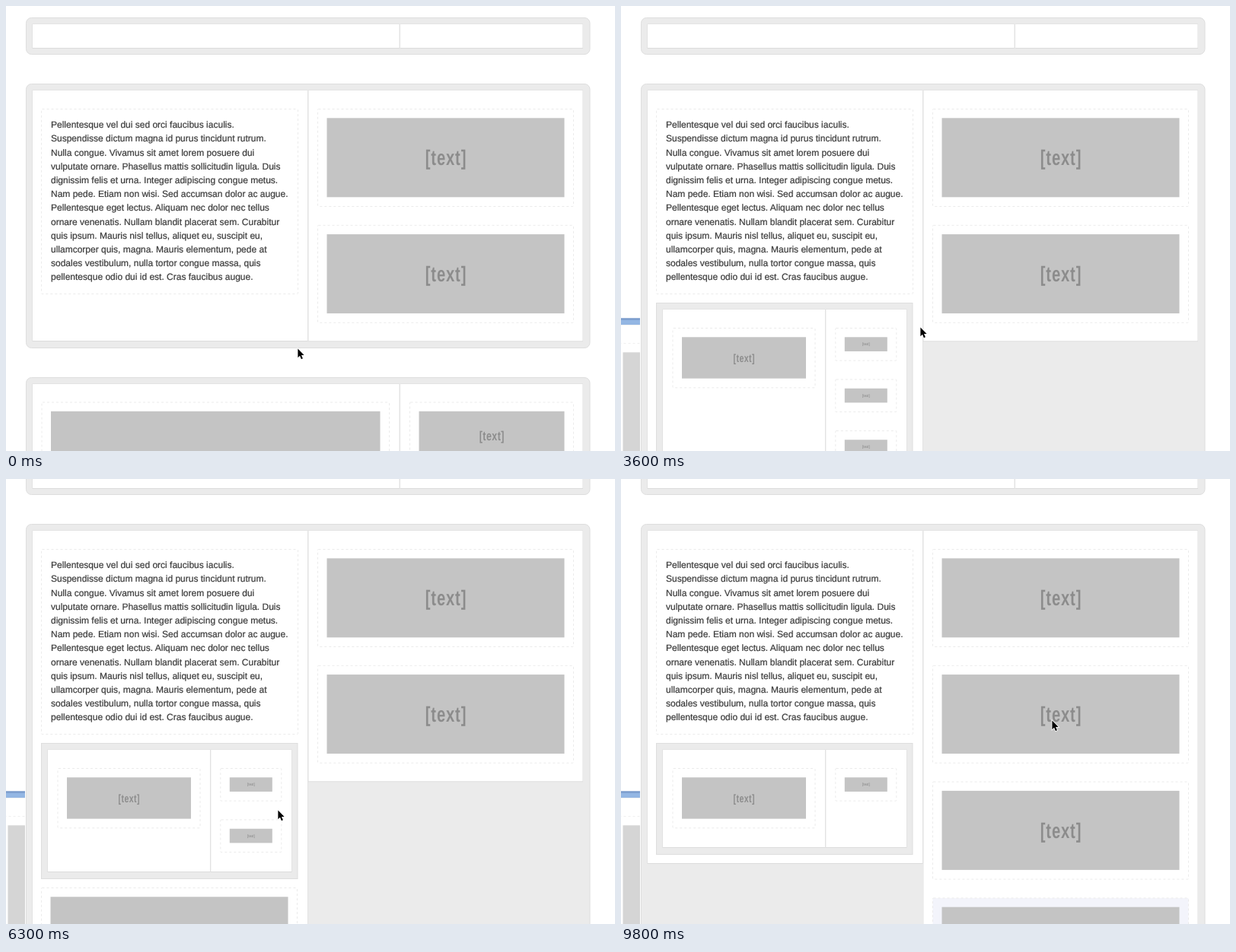
An HTML page that plays this animation: 800x585 px, repeating every 10000 ms.

```html
<!DOCTYPE html>
<html lang="en">
<head>
<meta charset="utf-8">
<title>Drag and drop layout</title>
<style>
  html, body { margin: 0; width: 100%; height: 100%; overflow: hidden; background: #fff; }
  svg { display: block; width: 800px; height: 585px; }
  text { font-family: "Liberation Sans", Arial, sans-serif; text-rendering: geometricPrecision; white-space: pre; }
</style>
</head>
<body>
<svg id="stage" viewBox="0 0 800 585" xmlns="http://www.w3.org/2000/svg"></svg>
<script>
const LOOP = 10000, STEP = 100;
const BLUE = '#6698d8', EDGE = '#4474b8', OUTLINE = '#5a8ac8';
const GAP = 24.8, PAD = 12, WIDE = 312;

const LINES = [
  'Pellentesque vel dui sed orci faucibus iaculis.',
  'Suspendisse dictum magna id purus tincidunt rutrum.',
  'Nulla congue. Vivamus sit amet lorem posuere dui',
  'vulputate ornare. Phasellus mattis sollicitudin ligula. Duis',
  'dignissim felis et urna. Integer adipiscing congue metus.',
  'Nam pede. Etiam non wisi. Sed accumsan dolor ac augue.',
  'Pellentesque eget lectus. Aliquam nec dolor nec tellus',
  'ornare venenatis. Nullam blandit placerat sem. Curabitur',
  'quis ipsum. Mauris nisl tellus, aliquet eu, suscipit eu,',
  'ullamcorper quis, magna. Mauris elementum, pede at',
  'sodales vestibulum, nulla tortor congue massa, quis',
  'pellentesque odio dui id est. Cras faucibus augue.'
];

// Time, then the values reached at that time.
const POINTER = [
  [0, 383, 450], [700, 372, 476], [1100, 361, 482], [1200, 361, 482],
  [2100, 304.5, 404.5], [2700, 304.5, 404.5], [3600, 393, 422], [3800, 368, 450],
  [4200, 322, 572], [4300, 322, 572], [4700, 317, 290], [4900, 317, 288],
  [6000, 352, 420], [6100, 352, 420], [6300, 357, 435], [6700, 230, 560],
  [7300, 577, 238], [7600, 577, 240], [8300, 309, 405], [8500, 309, 421],
  [8900, 309, 421], [9200, 440, 200], [9500, 566, 312], [9800, 566, 317]
];
const SCROLL = [[5400, 0], [6000, 38], [6100, 38], [6200, 43]];

const DRAGS = [
  { hot: 500, start: 1200, drop: 2800 },
  { hot: 4100, start: 4300, drop: 4775 },
  { hot: 6600, start: 6700, drop: 7360 },
  { hot: 8200, start: 8900, drop: 9455 }
];

function track(keys, t) {
  const next = keys.findIndex(key => key[0] > t);
  if (next === 0) return keys[0].slice(1);
  if (next < 0) return keys[keys.length - 1].slice(1);
  const a = keys[next - 1], b = keys[next];
  const u = (t - a[0]) / (b[0] - a[0]), k = u * u * (3 - 2 * u);
  return a.slice(1).map((v, i) => v + (b[i + 1] - v) * k);
}

const rect = (x, y, w, h, attrs) => `<rect x="${x}" y="${y}" width="${w}" height="${h}" ${attrs}/>`;
const group = (attrs, body) => `<g ${attrs}>${body}</g>`;
const shift = (x, y, body) => group(`transform="translate(${x} ${y})"`, body);

const handle = (x, y) =>
  `<path transform="translate(${x} ${y})" fill="${OUTLINE}" d="M0-6 4.5-1H2v2h2.5L0 6-4.5 1H-2v-2h-2.5Z"/>`;

const tag = (x, y) => rect(x - 6, y - 19.5, 107, 17.5, 'rx="1.5" fill="#3a3a3a"') +
  `<text x="${x}" y="${y - 6}" font-size="11.8" fill="#fff" stroke="#fff" stroke-width=".2">ENTER TO MOVE</text>`;

function flash(age) {
  if (age < 0 || age > 1000) return null;
  const k = Math.exp(-age / 150);
  return `rgb(${[135, 150, 212].map(c => Math.round(255 - (255 - c) * k))})`;
}

function outline(x, y, w, h, hot, fill) {
  const line = hot ? `stroke="${OUTLINE}"` : 'stroke="#ebebeb" stroke-dasharray="3 3"';
  return rect(x + .5, y + .5, w, h, `rx="1" fill="${fill || 'none'}" ${line}`);
}

const itemHeight = w => w / 3 + 2 * PAD;

// A placeholder picture; x and y are the corner of its dashed frame, w the picture's width.
function item(x, y, w, { hot, target, fill } = {}) {
  const s = w / WIDE, px = x + PAD + .5, py = y + PAD + .3;
  const picture = rect(px, py, w, w / 3, 'fill="#c4c4c4"') +
    `<text transform="translate(${px + w / 2 + .5 * s} ${py + 61.8 * s}) scale(${.72 * s} ${s})" ` +
    'font-size="28" font-weight="700" letter-spacing="1.2" text-anchor="middle" fill="#8c8c8c">[text]</text>';
  return outline(x, y, w + 2 * PAD, itemHeight(w), hot || target, fill) +
    group(`opacity="${target ? .55 : 1}"`, picture) +
    (hot ? handle(x + PAD + w / 2, y - 3) : '') + (target ? tag(x, y) : '');
}

function items(x, y, w, count, options = () => ({})) {
  return Array.from({ length: count }, (_, i) =>
    item(x, y + i * (itemHeight(w) + GAP), w, options(i))).join('');
}

const column = (x1, x2, top, bottom) =>
  rect(x1 - .5, top - .5, x2 - x1 + 1, bottom - top + 1.5, 'fill="#dcdcdc"') +
  rect(x1, top, x2 - x1, bottom - top, 'fill="#fff"');

function row(y, bottom, hot) {
  if (!hot) return rect(26.5, y + .5, 740.5, bottom - y, 'rx="7" fill="#ebebeb" stroke="#dedede"');
  return rect(27, y + 1, 739.5, bottom - y - 1, `rx="7" fill="${BLUE}" stroke="${EDGE}" stroke-width="2.4"`) +
    handle(396.5, y - 4);
}

const columns = (split, top, left, right) =>
  column(35, split - .7, top, left) + column(split + .7, 757.5, top, right);

function sideRow(hot) {
  return row(488, 760, hot) + columns(517.3, 497, 750, 750) +
    item(46.5, 520.5, 432.5) + items(530, 520.5, 191, 2);
}

function paragraph(target) {
  const color = target ? '#86a6de' : '#3c3c3c';
  const lines = LINES.map((line, i) => `<text x="59" y="${160.3 + i * 18.18}">${line}</text>`).join('');
  return outline(46, 135, 337, 243, target) +
    group(`font-size="12" fill="${color}" stroke="${color}" stroke-width=".22"`, lines) +
    (target ? tag(46, 135) : '');
}

function nestedRow(bottom, count, fill, hotIndex) {
  const inner = bottom - 9;
  return rect(46.5, 390.5, 336.5, bottom - 390, `fill="${fill || '#ebebeb'}" stroke="#dedede"`) +
    column(55, 268, 399, inner) + column(269.3, 375, 399, inner) +
    item(67.5, 423, 163) + items(281.3, 423, 56, count, i => ({ hot: i === hotIndex }));
}

function ghost(index, dx, dy) {
  const body = [
    () => sideRow(true),
    () => item(281.3, 423 + 2 * (itemHeight(56) + GAP), 56),
    () => item(46, 580, WIDE),
    () => item(281.3, 423, 56)
  ][index]();
  const backing = index ? '' : rect(27, 488, 740, 280, 'rx="7" fill="#fff" opacity=".5"');
  return shift(dx, dy, backing + group('opacity=".7"', body));
}

function arrow([x, y], copying) {
  const badge = '<circle cx="8" cy="17.8" r="7.5" fill="#4c9a20" stroke="#3b7d18"/>' +
    '<path d="M4.5 17.8h7M8 14.3v7" stroke="#fff" stroke-width="2"/>';
  return shift(x, y, '<path d="M.4.6V12.2L3 9.8 4.9 14.2 6.9 13.3 5 9H8.6Z" ' +
    'fill="#000" stroke="#fff" paint-order="stroke" stroke-width="1.6"/>' + (copying ? badge : ''));
}

function dropTarget(drag, x, y, nested, count) {
  if (drag < 0) return '';
  if (x > 397) {
    const i = Math.floor((y - 135) / (itemHeight(WIDE) + GAP));
    return i >= 0 && i < count ? 'item' + i : '';
  }
  if (y > 111 && y < (nested ? 384 : 440)) return 'text';
  return !nested && y >= 440 && y < 450 ? 'row' : '';
}

function scene(t) {
  const [toNested, toLeft, toRight, toRightAgain] = DRAGS.map(d => t - d.drop);
  const drag = DRAGS.findIndex(d => t > d.start && t < d.drop);
  const hot = DRAGS.findIndex(d => t >= d.hot && t < d.drop);
  const pointer = track(POINTER, t), scroll = track(SCROLL, t)[0];

  const nested = toNested >= 0;
  const small = toLeft < 0 ? 3 : toRightAgain < 0 ? 2 : 1;
  const leftItem = toLeft >= 0 && toRight < 0;
  const wide = toRight < 0 ? 2 : toRightAgain < 0 ? 3 : 4;
  const target = dropTarget(drag, pointer[0], pointer[1] + scroll, nested, wide);

  const nestedBottom = Math.max(527, 423 + 68 * small) + 9;
  const left = !nested ? 440 : leftItem ? nestedBottom + 164 : nestedBottom + 12;
  const right = 134.7 + wide * (itemHeight(WIDE) + GAP);

  let page = row(15, 63, false) + columns(517.3, 24, 55, 55) +
    row(102, Math.max(left, right) + 8.7, target === 'row') +
    columns(396.7, 111, left, right) + paragraph(target === 'text');
  if (nested) {
    const hotSmall = hot === 1 ? 2 : hot === 3 ? 0 : -1;
    const fill = toNested < 600 ? flash(toNested) : null;
    page += nestedRow(nestedBottom, small, fill, hotSmall);
  } else {
    page += sideRow(hot === 0);
  }
  if (leftItem) page += item(46, nestedBottom + 12, WIDE, { hot: hot === 2, fill: flash(toLeft) });
  page += items(409, 135, WIDE, wide, i => ({
    target: target === 'item' + i,
    fill: i === 2 ? flash(toRight) : i === 3 ? flash(toRightAgain) : null
  }));

  if (drag >= 0) {
    const from = track(POINTER, DRAGS[drag].start);
    page += ghost(drag, pointer[0] - from[0], pointer[1] - from[1]);
  }
  // The strip of the dragged row beside the page is never repainted.
  const trail = nested ? group('clip-path="url(#margin)"', ghost(0, -56.5, -77.5)) : '';
  return '<defs><clipPath id="margin"><rect width="25" height="585"/></clipPath></defs>' +
    trail + shift(0, -scroll, page) + arrow(pointer, drag >= 0);
}

const stage = document.getElementById('stage');
const begin = performance.now();
let shown = -1;

function tick() {
  const elapsed = Math.max(0, performance.now() - begin) % LOOP;
  const t = Math.floor(elapsed / STEP) * STEP;
  if (t !== shown) {
    stage.innerHTML = scene(t);
    shown = t;
  }
  requestAnimationFrame(tick);
}
tick();
</script>
</body>
</html>
```
